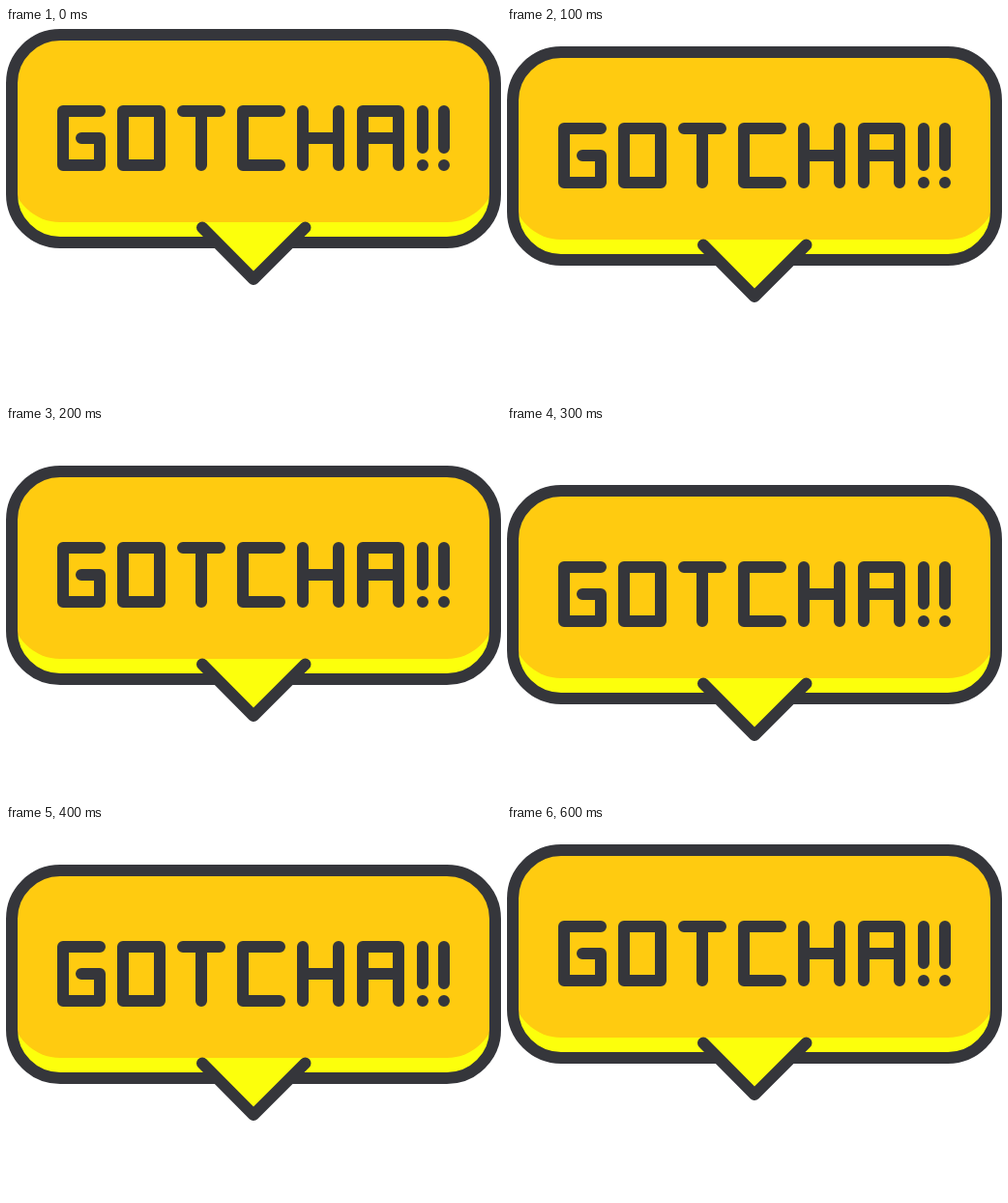
These frames come from a looping animation (512 px wide and 384 px high, 700 ms). An HTML page:

```html
<!DOCTYPE html>
<html lang="en">
<head>
<meta charset="utf-8">
<title>Gotcha</title>
<style>
  html, body { margin: 0; width: 100%; height: 100%; overflow: hidden; background: #fff; }
  svg { display: block; width: 100%; height: 100%; }
  .ink { fill: none; stroke: #35363b; stroke-width: 12; stroke-linecap: round; stroke-linejoin: round; }
</style>
</head>
<body>
<svg viewBox="0 0 512 384" role="img" aria-label="GOTCHA!!">
  <g id="bubble">
    <rect x="6" y="7" width="500" height="215" rx="50" fill="#fcff0c"/>
    <rect x="6" y="7" width="500" height="194" rx="50" fill="#ffcb10"/>
    <rect class="ink" x="6" y="7" width="500" height="215" rx="50"/>
    <path d="M203 206L256 260L309 206Z" fill="#fcff0c"/>
    <path class="ink" d="M203 206.5L256 260L309.5 206.5"/>
    <g class="ink">
      <path d="M97 86H59V142H97V114H78"/>
      <path d="M121 86H159V142H121Z"/>
      <path d="M183 86H221M202 86V142"/>
      <path d="M283 86H245V142H283"/>
      <path d="M307 86V142M344 86V142M307 114H344"/>
      <path d="M369 142V86H406V142M369 114H406"/>
      <path d="M431 86V124M431 142h0M453 86V124M453 142h0"/>
    </g>
  </g>
</svg>
<script>
  const STEP = 100;
  const drops = [0, 18, 39, 59, 39, 39, 18];
  const bubble = document.getElementById('bubble');
  const start = performance.now();

  function draw(ms) {
    const y = drops[Math.floor(ms / STEP) % drops.length];
    bubble.setAttribute('transform', `translate(0 ${y})`);
  }

  function tick() {
    draw(performance.now() - start);
    requestAnimationFrame(tick);
  }
  tick();
</script>
</body>
</html>
```
